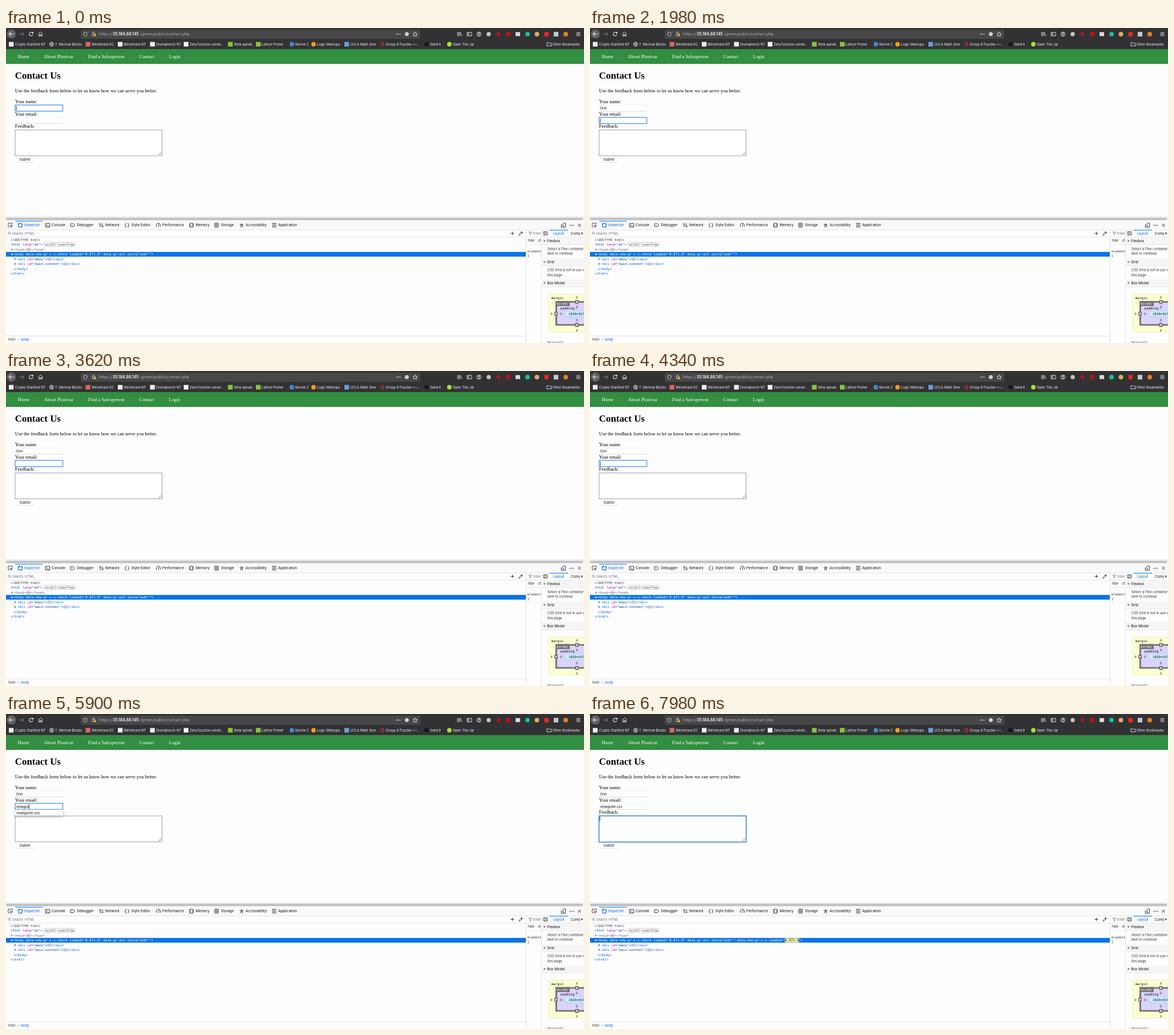
An HTML page with a canvas that plays this animation: 1013 by 553 pixels, repeating every 8000 ms.

```html
<!DOCTYPE html>
<html lang="en">
<head>
<meta charset="utf-8">
<title>Contact form</title>
<style>
html, body { margin: 0; width: 100%; height: 100%; overflow: hidden; background: #fdfdfe; }
canvas { display: block; }
</style>
</head>
<body>
<canvas id="stage" width="1013" height="553"></canvas>
<script>
const ctx = document.getElementById('stage').getContext('2d');
const LOOP = 8000;
const UI = 'Inter, sans-serif';
const SERIF = '"Liberation Serif", serif';
const MONO = '"DejaVu Sans Mono", monospace';
const PAGE = '#fdfdfe', INK = '#0c0c0d', LINE = '#dcdce0', BLUE = '#0060df', GREY = '#737376';
const TAG = '#0060df', ATTR = '#dd00a9', VALUE = '#003eaa';

// Basic shapes
function rect(x, y, w, h, color) {
  ctx.fillStyle = color;
  ctx.fillRect(x, y, w, h);
}
function frame(x, y, w, h, color, width = 1) {
  ctx.strokeStyle = color;
  ctx.lineWidth = width;
  ctx.strokeRect(x, y, w, h);
}
function pill(x, y, w, h, r, fill, stroke) {
  ctx.beginPath();
  ctx.roundRect(x, y, w, h, r);
  if (fill) { ctx.fillStyle = fill; ctx.fill(); }
  if (stroke) { ctx.strokeStyle = stroke; ctx.lineWidth = 0.8; ctx.stroke(); }
}
function dot(x, y, r, color) {
  ctx.beginPath();
  ctx.arc(x, y, r, 0, 7);
  ctx.fillStyle = color;
  ctx.fill();
}
function ring(x, y, r, color, from = 0, to = 2 * Math.PI, width = 1) {
  ctx.beginPath();
  ctx.arc(x, y, r, from, to);
  ctx.strokeStyle = color;
  ctx.lineWidth = width;
  ctx.stroke();
}
// SVG path data relative to x, y
function path(d, x, y, color, width = 1, fill = false) {
  ctx.save();
  ctx.translate(x, y);
  const p = new Path2D(d);
  if (fill) { ctx.fillStyle = color; ctx.fill(p); }
  else { ctx.strokeStyle = color; ctx.lineWidth = width; ctx.stroke(p); }
  ctx.restore();
}
function dots(x, y, gap, r, color) {
  for (let i = -1; i <= 1; i++) dot(x + i * gap, y, r, color);
}
const right = (x, y, color) => path('M-1.2-2L1.6 0L-1.2 2Z', x, y, color, 1, true);
const down = (x, y, color) => path('M-2.2-1.2H2.2L0 1.7Z', x, y, color, 1, true);

// Text centred on its capitals at y; returns the end position
function text(str, x, y, size = 6.2, color = INK, family = UI, style = '') {
  ctx.font = `${style} ${size}px ${family}`;
  ctx.fillStyle = color;
  ctx.fillText(str, x, y + size * 0.35);
  return x + ctx.measureText(str).width;
}
const mono = (str, x, y, color = INK, style = '') => text(str, x, y, 5.81, color, MONO, style);
function runs(parts, x, y) {
  for (const [str, color] of parts) x = mono(str, x, y, color);
  return x;
}

function toolbar() {
  const w = '#e8e8ea';
  rect(0, 0, 1013, 37, '#323235');
  dot(9.5, 10.5, 8, '#626266');
  path('M4 0H-4M-.6-3.4L-4 0L-.6 3.4', 9.5, 10.5, w, 1.2);
  path('M-4 0H4M.6-3.4L4 0L.6 3.4', 27, 10.5, '#77777b', 1.1);
  ring(44, 10.5, 3.2, w, 0.3, 5.5, 1.1);
  path('M.4-.6H4V-4Z', 44, 10, w, 1, true);
  path('M-4 .2L0-3.7L4 .2M-2.8 0V3.7H-.8V1H.8V3.7H2.8V0', 60.5, 10.5, w);

  pill(131, 3, 595, 16, 2, '#47474a');
  path('M0-3.5L3-2.5V0C3 2 1 3.2 0 3.7C-1 3.2-3 2-3 0V-2.5Z', 139, 10.8, '#d5d5d8', 0.9);
  path('M-2.2-.5H2.2V3.3H-2.2ZM-1.4-.5V-2A1.4 1.4 0 0 1 1.4-2V-.5', 153.5, 10.3, '#cfcfd2', 0.9);
  path('M1.5-1.5L4 3.7H-1Z', 154.5, 10.5, '#ffbf00', 1, true);
  text('https://', 163, 11, 7, '#aeaeb2');
  text('35.184.88.145', 187, 11, 6.9, '#fbfbfe', UI, '600');
  text('/green/public/contact.php', 235, 11, 7, '#aeaeb2');
  dots(687.5, 10.7, 3, 0.9, w);
  dot(702.5, 10.7, 3.4, '#d0d0d3');
  path('M0-4L1.2-1.3L4-1L1.9 .9L2.5 3.7L0 2.2L-2.5 3.7L-1.9 .9L-4-1L-1.2-1.3Z', 717, 10.8, w, 0.9);

  path('M-3.5-3.5V3.5M-1.5-3.5V3.5M.5-3.5V3.5M1.7-3.2L4 3.4', 795, 10.7, w, 0.9);
  path('M-4-3H4V3.2H-4ZM-1-3V3.2M-3-1H-1.8M-3 .6H-1.8', 812, 10.7, w, 0.9);
  ring(829, 10.7, 3.7, w);
  dot(829, 9.7, 1.4, w);
  path('M-2.2 2.4Q0 .2 2.2 2.4Z', 829, 10.7, w, 1, true);
  dot(846, 10.8, 3.7, '#c9c5bc');
  dot(863, 10.8, 3.6, '#a51521');
  rect(876.5, 7, 7.5, 7.5, '#b51310');
  rect(893, 7.2, 8, 7, '#d8d8dc');
  dot(914, 10.8, 4, '#13c39a');
  dot(930.5, 10.8, 4, '#d9b25b');
  rect(943.5, 7, 7.5, 7.5, '#ef2626');
  rect(960, 6.8, 8, 8, '#c8c8ca');
  dot(981, 10.8, 4, '#e8821e');
  path('M-3.5-2.5H3.5M-3.5 0H3.5M-3.5 2.5H3.5', 1003, 10.7, w, 1);
}

// label, icon x, label x, icon colour, round icon
const bookmarks = [
  ['Crypto Stanford NT', 5, 16, '#efefef'],
  ['T. Merrow Blurbs', 76, 86, '', true],
  ['Winterlund EC', 139.5, 150, '#d9675f'],
  ['Winterlund NT', 196, 206, '#f1e9ec'],
  ['Dromalovich NT', 252.5, 263, '#eeeeee'],
  ['Zeta function univer...', 311.5, 322, '#f6f6f6'],
  ['Beta spirals', 389, 400, '#83c73a'],
  ['Lattice Primer', 438, 448, '#83c73a'],
  ['Norvik C', 497, 507, '#4688d0', true],
  ['Logic Meetups', 535, 545, '#f59d20', true],
  ['UCLA Math Sem', 593, 603.5, '#6a9cd4'],
  ['Group # Puzzles <= ...', 656, 666, '#7b3038', true],
  ['Seed It', 733, 743, '#18181a', true],
  ['Open The Jar', 773, 783, '#a0e632', true],
];
function bookmarkBar() {
  for (const [label, ix, tx, color, round] of bookmarks) {
    if (!color) {
      ring(ix + 4, 28.5, 3.6, '#e4e4e6', 0, 7, 0.8);
      path('M-3.6 0H3.6M0-3.6V3.6M0-3.6Q-3.5 0 0 3.6Q3.5 0 0-3.6', ix + 4, 28.5, '#e4e4e6', 0.6);
    } else if (round) dot(ix + 4, 28.5, 3.9, color);
    else rect(ix, 24.5, 8.3, 8, color);
    text(label, tx, 28.6, 5.8, '#f3f3f5');
  }
  path('M-4-2.6H-1L0-1.5H4V3H-4Z', 952, 28.3, '#e4e4e6', 0.9);
  text('Other Bookmarks', 958, 28.6, 5.8, '#f3f3f5');
}

function input(y, value, focused, caret) {
  rect(16, y, 83.5, 11, '#fff');
  if (focused) {
    frame(16, y + 0.2, 83.5, 10.8, '#69a4ee', 1.6);
  } else {
    frame(16.3, y + 0.5, 83, 10.5, '#ebebee', 0.7);
    rect(16, y + 10.6, 83.5, 0.7, '#d4d4d8');
  }
  const end = text(value, 17.8, y + 5.8, 5.8, INK);
  if (caret) rect(end, y + 2, 0.8, 7.6, '#111');
}
function suggestions(y, items) {
  ctx.save();
  ctx.shadowColor = 'rgba(0,0,0,.32)';
  ctx.shadowBlur = 5;
  ctx.shadowOffsetY = 1.5;
  rect(16, y, 84, items.length * 10.5, '#fff');
  ctx.restore();
  items.forEach((item, i) => text(item, 18.3, y + 5.4 + i * 10.5, 6.2, '#111'));
}

function page(s) {
  const serif = (str, x, y, size = 8.44, color = '#000', style = '') => text(str, x, y, size, color, SERIF, style);
  rect(0, 37, 1013, 26, '#328e40');
  [['Home', 20.5], ['About Plonivar', 66.5], ['Find a Salesperson', 144], ['Contact', 233.5], ['Login', 285.5]]
    .forEach(([label, x]) => serif(label, x, 50, 8.44, '#fff'));
  serif('Contact Us', 15.8, 83.5, 16.88, '#000', 'bold');
  serif('Use the feedback form below to let us know how we can serve you better.', 15.8, 110.5);
  serif('Your name:', 15.8, 129);
  serif('Your email:', 15.8, 150.7);
  serif('Feedback:', 15.8, 172.2);

  input(135, s.name, s.field === 0, s.caret && s.field === 0);
  input(156.7, s.email, s.field === 1, s.caret && s.field === 1);

  rect(16, 179, 257.5, 45.5, '#fff');
  if (s.field === 2) {
    frame(15.8, 178.8, 258, 46, '#5b97e2', 1.9);
    rect(16.9, 180.2, 0.8, 7, '#111');
  } else frame(16, 179, 257.5, 45.3, '#939396', 0.9);
  path('M-5 0L0-5M-2.5 0L0-2.5', 272, 223, '#777', 0.8);

  rect(16.5, 227, 33.5, 8.6, '#fff');
  rect(17, 235.4, 32.5, 0.7, '#d4d4d8');
  text('Submit', 23.5, 231.3, 5.8);

  if (s.field === 0 && s.name) suggestions(146.4, [NAME, NAME + ' Vell']);
  if (s.field === 1 && s.email) suggestions(168, [EMAIL]);
}

const tabs = [
  ['Inspector', 25, 32, 'M-3.2-3.2H3.2V3.2H-3.2ZM-4.2-1H-2M2-1H4.2M-1-4.2V-2M1 2V4.2'],
  ['Console', 73, 80, 'M-3.8-3.2H3.8V3.2H-3.8ZM-2.3-1.5L-.8 0L-2.3 1.5M0 1.5H2'],
  ['Debugger', 117, 124.5, 'M-3.8-2.5H1.2L3.8 0L1.2 2.5H-3.8Z'],
  ['Network', 167, 174, 'M-2 3.4V-3M-4-1L-2-3.2L0-1M2-3.4V3M0 1L2 3.2L4 1'],
  ['Style Editor', 212, 219.5, 'M-1-3.5Q-2.6-3.5-2.5-1.8Q-2.5 0-3.7 0Q-2.5 0-2.5 1.8Q-2.6 3.5-1 3.5M1-3.5Q2.6-3.5 2.5-1.8Q2.5 0 3.7 0Q2.5 0 2.5 1.8Q2.6 3.5 1 3.5'],
  ['Performance', 267, 274, 'M-3.2 2.5A3.8 3.8 0 1 1 3.2 2.5M0 1.2L1.7-1.5M-1 2H1'],
  ['Memory', 325, 332.5, 'M-2.4-3.4H2.4V3.4H-2.4ZM-4-2H-2.4M-4 0H-2.4M-4 2H-2.4M2.4-2H4M2.4 0H4M2.4 2H4'],
  ['Storage', 369, 376.5, 'M-3-3.5H3V3.5H-3ZM-3-.2H3M-1-1.9H1M-1 1.6H1'],
  ['Accessibility', 413, 420, 'M-3.5-1.2H3.5M0-1.2V1M-1.8 3.8L-.8-1M1.8 3.8L.8-1M-.7-3H.7'],
  ['Application', 470, 477, 'M-3.5-3H-1.7M-.9-3H.9M1.7-3H3.5M-3.5 0H-1.7M-.9 0H.9M1.7 0H3.5M-3.5 3H-1.7M-.9 3H.9M1.7 3H3.5'],
];
function devtoolsBar() {
  rect(0, 331, 1013, 7.5, '#f1f1f2');
  rect(0, 331, 1013, 0.6, '#dedee0');
  pill(0, 333.2, 1011, 4, 2, '#c0c0c2');
  rect(0, 338.5, 1013, 15.5, '#f9f9fa');
  rect(0, 354, 1013, 0.7, LINE);
  rect(0, 366.6, 1013, 0.7, LINE);
  path('M-.8 3H-3.6V-3.4H3.6V-.6M0-.2L4 1.3L2.2 2.1L1.4 4Z', 7.5, 346, '#38383d', 0.9);
  rect(16, 338.6, 48, 1.1, '#0a84ff');
  tabs.forEach(([label, ix, tx, icon], i) => {
    path(icon, ix, 346.2, i ? '#38383d' : BLUE, i === 9 ? 1.7 : 1);
    text(label, tx, 346.3, 6.2, i ? INK : BLUE);
  });
  path('M-1.5-3.6H3.5V3.5H-.2M-3.8-.5H-.2V3.5H-3.8Z', 977, 346.2, '#38383d');
  dots(991.5, 346.3, 3, 0.9, '#38383d');
  path('M-2.5-2.5L2.5 2.5M2.5-2.5L-2.5 2.5', 1005, 346.2, '#38383d');

  ring(5.6, 360, 1.9, GREY, 0, 7, 0.8);
  path('M0 0L2 2', 7, 361.4, GREY, 0.9);
  text('Search HTML', 10.5, 360.5, 6.1, GREY);
  path('M-3 0H3M0-3V3', 887.5, 360.5, '#38383d');
  path('M-3.2 3.2L-2.6 1.2L.8-2.2L2.2-.8L-1.2 2.6Z', 902, 360.7, '#38383d', 0.9);
  path('M0-2.8L2.8 0L3.4-2.2L2.2-3.4Z', 902, 360.7, '#38383d', 1, true);
}

function ellipsis(x, y) {
  pill(x + 0.4, y - 2.4, 7.4, 4.8, 1.4, '#e4e4e7', '#b7b7bb');
  dots(x + 4.1, y, 1.8, 0.55, '#444');
  return x + 8.6;
}
function badge(label, x, w) {
  pill(x, 376.3, w, 7.4, 1.6, '#f7f7f8', '#c4c4c8');
  text(label, x + 2, 379.9, 5.4, '#44444a', MONO);
}
function markup(s) {
  const row = i => 372 + i * 8.45;
  path('M0 0V24', 16, 401.5, '#dedee2', 0.6);
  mono('<!DOCTYPE html>', 8, row(0), '#38383d', 'italic');
  runs([['<html ', TAG], ['lang', ATTR], ['="', TAG], ['en', VALUE], ['">', TAG]], 8, row(1));
  badge('scroll', 66.3, 23.5);
  badge('overflow', 91.3, 29.5);

  right(10.5, row(2), GREY);
  mono('</head>', ellipsis(mono('<head>', 13.8, row(2), GREY) + 0.5, row(2)), row(2), GREY);

  rect(0, 393.1, 911, 8.3, '#0a74e6');
  down(10.5, row(3), '#fff');
  let x = mono('<body data-new-gr-c-s-check-loaded="8.871.0" data-gr-ext-installed=""', 13.6, row(3), '#fff');
  if (s.attribute) {
    x = mono(' data-new-gr-c-s-loaded="', x, row(3), '#fff');
    rect(x, 393.6, 24.5, 7.3, '#fff49a');
    x = mono('8.871.0', x, row(3), '#222');
    x = mono('"', x, row(3), '#fff');
  }
  mono('>', x, row(3), '#fff');

  ['menu', 'main-content'].forEach((id, i) => {
    const y = row(4 + i);
    right(16, y, GREY);
    const end = runs([['<div ', TAG], ['id', ATTR], ['="', TAG], [id, VALUE], ['">', TAG]], 19.7, y);
    mono('</div>', ellipsis(end, y), y, TAG);
  });
  mono('</body>', 13.6, row(6), TAG);
  mono('</html>', 8, row(7), TAG);

  rect(0, 540.5, 911, 0.7, LINE);
  text('html', 4, 547, 6, '#38383d');
  path('M-.8-1.4L.8 0L-.8 1.4', 21.3, 547.2, GREY, 0.7);
  text('body', 26.3, 547, 6, BLUE);
}

function section(label, y) {
  rect(938.5, y - 6.4, 75, 12.8, '#f5f5f7');
  rect(938.5, y + 6.2, 75, 0.6, LINE);
  down(943.7, y, GREY);
  text(label, 948.5, y, 6.2);
}
function sidePanels() {
  rect(911, 354, 0.8, 199, LINE);
  path('M-2.7-2.5H2.7L.7 0V2.8L-.7 2V0Z', 919, 360.6, GREY, 0.8);
  text('Filter', 923.5, 360.6, 6.1, GREY);
  path('M-3.5-2.8H3.5V3H-3.5ZM-1-2.8V3M2.2-1.3L.5 0L2.2 1.4', 945.5, 360.5, '#38383d', 0.9);
  rect(952, 354.4, 33, 1.1, '#0a84ff');
  text('Layout', 958.5, 360.6, 6.2, BLUE);
  text('Comp', 990, 360.6, 6.2);
  rect(1005.5, 355, 8, 11, '#f9f9fa');
  down(1009.2, 360.7, '#38383d');

  text(':hov', 914, 373.3, 5.9);
  text('.cl', 931, 373.3, 5.9);
  rect(911.5, 379.8, 26.5, 0.6, LINE);
  mono('element', 913.8, 392.2, '#38383d');
  mono('}', 913.8, 400.3, '#38383d');
  rect(938, 354, 0.8, 199, LINE);

  section('Flexbox', 373.8);
  section('Grid', 410.8);
  section('Box Model', 447.8);
  const note = (str, y) => text(str, 948.8, y, 5.9, '#2c2c30', UI, 'italic');
  note('Select a Flex container or', 387.6);
  note('item to continue.', 396.2);
  note('CSS Grid is not in use on', 425);
  note('this page', 433.5);
}

function boxModel() {
  rect(951, 467.5, 70, 66.5, '#fdffd2');
  ctx.setLineDash([2, 1.5]);
  frame(951, 467.5, 70, 66.5, '#d8d58a', 0.7);
  ctx.setLineDash([]);
  rect(963, 479.5, 60, 43, '#6f6f72');
  rect(965.8, 482.2, 60, 37.6, '#dcd3fb');
  rect(963, 479.5, 25, 8.6, '#6f6f72');
  mono('margin', 955.8, 474);
  mono('border', 965, 484, '#fff');
  mono('padding', 971.8, 492.3);
  ctx.setLineDash([1.5, 1]);
  rect(980, 496.8, 40, 10, '#cdeefd');
  frame(980, 496.8, 40, 10, '#79b9dc', 0.7);
  ctx.setLineDash([]);
  mono('1920×557', 986, 501.7);
  [[1000.5, 481], [1000.5, 521.3], [964, 501.5]].forEach(([x, y]) => {
    pill(x - 3, y - 3.6, 6, 7.2, 1, '#6f6f72');
    rect(x - 1.2, y - 1.8, 2.4, 3.6, '#e9e9ec');
  });
  [[1000.5, 472.7], [1000.5, 490.3], [1000.5, 512.7], [1000.5, 531], [956, 501.7], [973, 501.7]]
    .forEach(([x, y]) => mono('0', x - 1.75, y, '#45454a'));
  text('1920×557', 948, 552.6, 6.2, '#55555a');
}

const NAME = 'Orin', EMAIL = 'neat@site.zzz';
// Letters typed at a steady pace from a start time
const typed = (str, t, start, step) => str.slice(0, Math.max(0, Math.floor((t - start) / step) + 1));

function stateAt(t) {
  return {
    name: typed(NAME, t, 500, 290),
    email: typed(EMAIL, t, 4350, 255),
    field: t < 1760 ? 0 : t < 7660 ? 1 : 2,
    caret: t < 3000 || t >= 4200,
    attribute: t >= 7720,
  };
}

function draw() {
  const s = stateAt(performance.now() % LOOP);
  rect(0, 0, 1013, 553, PAGE);
  toolbar();
  bookmarkBar();
  page(s);
  devtoolsBar();
  markup(s);
  sidePanels();
  boxModel();
  requestAnimationFrame(draw);
}
requestAnimationFrame(draw);
</script>
</body>
</html>
```
